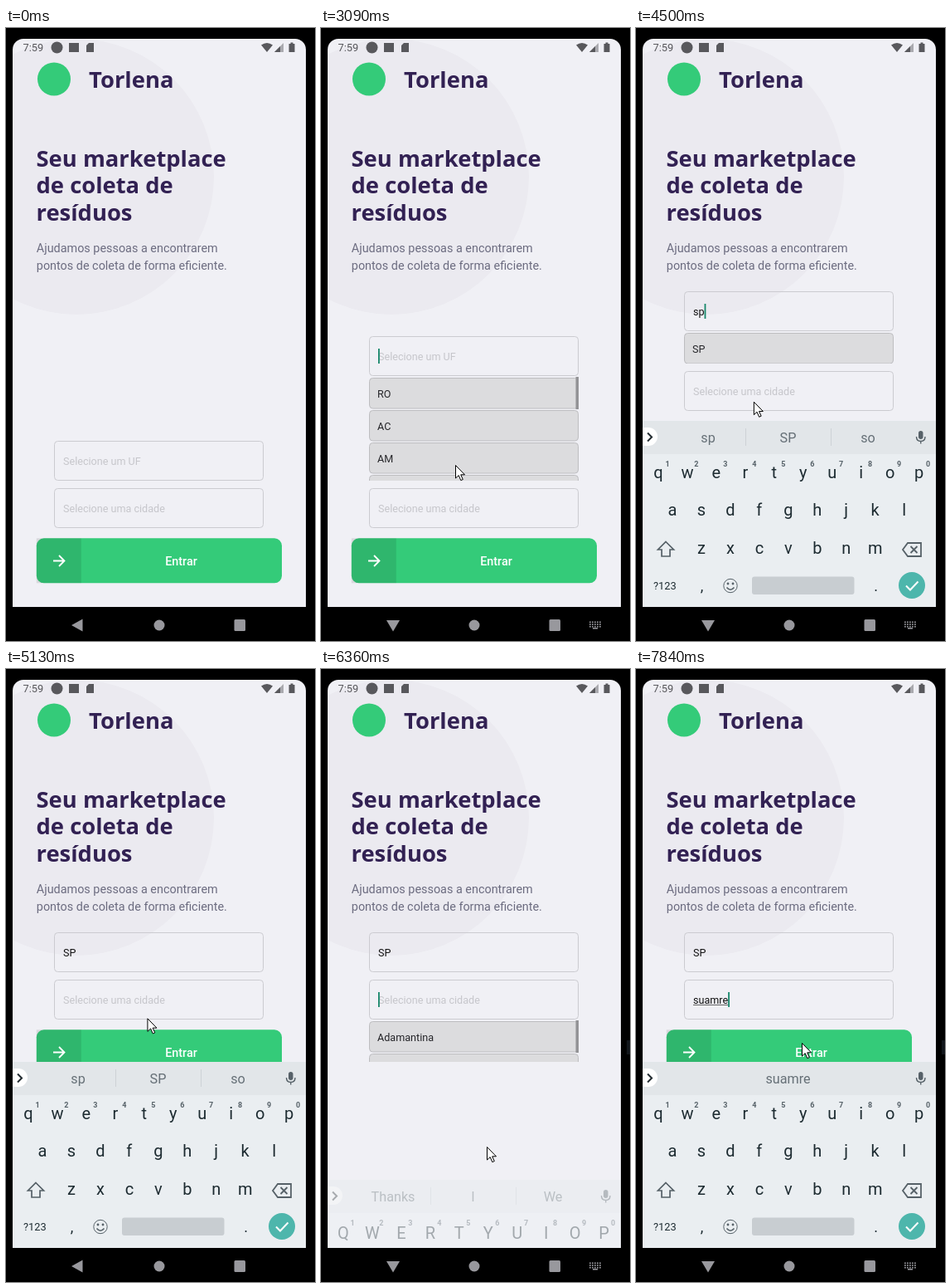
An HTML page with a canvas for the animation above (8 s loop, 373x738 px).

```html
<!DOCTYPE html>
<html lang="pt-BR">
<head>
<meta charset="utf-8">
<title>Torlena</title>
<style>
html, body { margin: 0; width: 100%; height: 100%; overflow: hidden; background: #000; }
canvas { display: block; width: 373px; height: 738px; }
</style>
</head>
<body>
<canvas id="stage"></canvas>
<script>
const W = 373, H = 738, LOOP = 8000, FOLD = 473;
const canvas = document.getElementById('stage');
const c = canvas.getContext('2d');
const dpr = window.devicePixelRatio || 1;
canvas.width = W * dpr;
canvas.height = H * dpr;

// [time, value] lists: the last entry that has begun applies
const pick = (steps, t) => steps.reduce((v, s) => t >= s[0] ? s[1] : v, steps[0][1]);
const within = (t, a, b) => t >= a && t < b;
const ramp = (t, a, b) => Math.min(1, Math.max(0, (t - a) / (b - a)));
const easeOut = p => 1 - (1 - p) ** 2;

const states = ['RO', 'AC', 'AM', 'RR'];
const cities = ['Adamantina', 'Adolfo', 'Aguaí', 'Agudos'];
const stateText = [[0, ''], [3800, 's'], [4345, 'sp'], [4965, 'SP']];
const stateList = [[0, []], [3005, states], [4105, ['SE', 'SP', 'SC']], [4415, ['SP']], [4965, []]];
const cityText = [[0, ''], [7075, 's'], [7295, 'su'], [7420, 'sua'], [7540, 'suam'], [7690, 'suamr'], [7800, 'suamre']];
const cityList = [[0, []], [6125, cities], [7145, ['Sabino', 'Sales', 'Salto', 'Santos']],
  [7375, ['Sud Mennucci', 'Sumaré', 'Suzano']], [7500, []]];
const hints = [[0, ['Thanks', 'I', 'We']], [3800, ['s', 'so', 'she']], [4415, ['sp', 'SP', 'so']],
  [5500, ['Thanks', 'I', 'We']], [7295, ['su', 'Su', 'so']], [7500, null]];
const pointer = [[1225, 282, 731], [1390, 262, 660], [1540, 190, 560], [1690, 150, 514], [1770, 162, 526],
  [4340, 162, 526], [4500, 142, 450], [4700, 112, 385], [4960, 112, 385], [5130, 170, 420],
  [5350, 263, 494], [5600, 215, 568], [5750, 200, 575], [6440, 200, 575], [6670, 200, 450]];

function text(s, x, y, size, color, { align = 'left', weight = 400, family = 'Roboto' } = {}) {
  c.font = `${weight} ${size}px ${family}, sans-serif`;
  c.textAlign = align;
  c.fillStyle = color;
  c.fillText(s, x, y);
}
function rect(x, y, w, h, color) {
  c.fillStyle = color;
  c.fillRect(x, y, w, h);
}
function round(x, y, w, h, r, fill, stroke) {
  c.beginPath();
  c.roundRect(x, y, w, h, r);
  paint(fill, stroke);
}
function circle(x, y, r, fill, stroke) {
  c.beginPath();
  c.arc(x, y, r, 0, 7);
  paint(fill, stroke);
}
function path(d, fill, stroke, width = 1, x = 0, y = 0) {
  c.save();
  c.translate(x, y);
  c.lineWidth = width;
  const p = new Path2D(d);
  if (fill) { c.fillStyle = fill; c.fill(p); }
  if (stroke) { c.strokeStyle = stroke; c.stroke(p); }
  c.restore();
}
function paint(fill, stroke) {
  if (fill) { c.fillStyle = fill; c.fill(); }
  if (stroke) { c.lineWidth = 1; c.strokeStyle = stroke; c.stroke(); }
}

function statusBar() {
  const ink = '#58585c';
  text('7:59', 20.5, 28, 12.8, ink);
  circle(61.5, 23.5, 7, ink);
  rect(76, 18, 12, 11, ink);
  path('M100 18h6v11h-9v-8z', ink);
  path('M308 20.5q7-5 14 0l-7 8.5z', ink);
  path('M335 18v11h-11z', '#a9a9ae');
  path('M331 22v7h-7z', ink);
  path('M341.5 19h2v-1.5h3v1.5h2v10h-7z', ink);
}

function header() {
  const title = { weight: 700, family: '"Open Sans"' };
  circle(85, 179, 166, '#ebeaf0');
  statusBar();
  circle(58, 61.5, 20, '#34cb79');
  text('Torlena', 100, 72, 27.4, '#322153', title);
  ['Seu marketplace', 'de coleta de', 'resíduos'].forEach((s, i) =>
    text(s, 36.5, 167 + 32.3 * i, 27.4, '#322153', title));
  text('Ajudamos pessoas a encontrarem', 36.8, 269.5, 14.4, '#6c6c80');
  text('pontos de coleta de forma eficiente.', 36.8, 291, 14.4, '#6c6c80');
}

function field(y, value, placeholder, focused, underlined) {
  round(58.5, y + .5, 252, 47, 4, null, '#cbcbd0');
  text(value || placeholder, 69, y + 28.5, 12.6, value ? '#111' : '#c6c6cb');
  const w = value ? c.measureText(value).width : 0;
  if (underlined) rect(69, y + 30, w, 1, '#666');
  if (focused) rect(69 + w, y + 15, 1.8, 18, '#16876a');
}

const listHeight = items => Math.min(126, items.length * 39);

function list(y, items) {
  if (!items.length) return;
  c.save();
  c.beginPath();
  c.rect(57, y + 49, 256, listHeight(items) - 1);
  c.clip();
  items.forEach((s, i) => {
    const top = y + 50 + 39 * i;
    round(58.5, top + .5, 252, 36.5, 4, '#dcdcde', '#bdbdc0');
    text(s, 68, top + 23.5, 12.6, '#26262a');
  });
  if (items.length > 3) rect(307.5, y + 49, 3.5, 39, '#939396');
  c.restore();
}

function button(y) {
  round(36.8, y, 296.2, 54, 9, '#34cb79');
  rect(36.8, y, 54, 54, 'rgba(0,0,0,.1)');
  path('M57 0H70M64-6.5 70.5 0 64 6.5', null, '#fff', 1.8, 0, y + 27.2);
  text('Entrar', 211.5, y + 32.5, 14.4, '#fff', { align: 'center', weight: 500 });
}

function form(t) {
  const ufs = pick(stateList, t), towns = pick(cityList, t);
  const ufH = listHeight(ufs), townH = listHeight(towns);
  const raised = within(t, 3325, 5275) || t >= 6285;
  const ufY = raised ? 317 : 497 - ufH - townH;
  const cityY = ufY + 57 + ufH;
  c.save();
  if (within(t, 3175, 5275) || t >= 6205) {
    c.beginPath();
    c.rect(0, 0, W, FOLD);
    c.clip();
  }
  field(ufY, pick(stateText, t), 'Selecione um UF', within(t, 1935, 4965));
  list(ufY, ufs);
  field(cityY, pick(cityText, t), 'Selecione uma cidade', t >= 5965, t >= 7075);
  list(cityY, towns);
  button(cityY + 60.3 + townH);
  c.restore();
}

function suggestions(words) {
  const word = (s, x) => text(s, x, 499, 16.2, '#667077', { align: 'center' });
  rect(8, FOLD, 354, 40, '#e2e6e9');
  round(-4, 481, 30, 22, 11, '#fff');
  path('M14 487.5l5 5-5 5', null, '#222b30', 2);
  if (words.length > 1) {
    [132, 235].forEach(x => rect(x, 482, 1, 21, '#cdd2d6'));
    words.forEach((s, i) => word(s, 87 + 96.5 * i));
  } else word(words[0], 183.5);
  round(341, 485, 5.5, 10, 2.75, '#566168');
  path('M338.5 492q0 5.5 5.25 5.5t5.25-5.5M343.75 497.5v3', null, '#566168', 1.4);
}

function keyboard(t) {
  const shown = t < 5500 ? ramp(t, 3500, 3720) * (1 - ramp(t, 5180, 5345)) : ramp(t, 6310, 6560);
  if (!shown) return;
  const upper = t < 3800 || within(t, 5500, 7295);
  const ink = '#1d2b31', soft = '#566168';
  c.save();
  c.beginPath();
  c.rect(8, FOLD, 354, 224);
  c.clip();
  c.globalAlpha = easeOut(shown);
  c.translate(0, (1 - easeOut(shown)) * 224);
  rect(8, 513, 354, 184, '#eaeef1');
  suggestions(pick(hints, t) || [pick(cityText, t)]);
  ['qwertyuiop', 'asdfghjkl', 'zxcvbnm'].forEach((row, r) => [...row].forEach((k, i) => {
    const x = [27, 44, 79][r] + 34.95 * i, y = 542 + 45.3 * r;
    text(upper ? k.toUpperCase() : k, x, y + (upper ? 2 : 0), 20, ink, { align: 'center' });
    if (!r) text((i + 1) % 10, x + 11, 528, 9, soft, { align: 'center', weight: 700 });
  }));
  path('M36 618.5l9.5 9.5h-4.5v8h-10v-8h-4.5z', upper ? soft : null, soft, 1.7);
  path('M322 628l6-8h16v16h-16zM331.5 624l8 8m0-8l-8 8', null, soft, 1.8);
  text('?123', 21, 676, 12.8, ink);
  text(',', 79.5, 678, 18, ink, { align: 'center' });
  circle(114, 671.5, 8.2, null, soft);
  circle(111, 669, 1.4, soft);
  circle(117, 669, 1.4, soft);
  path('M109.5 673.5q4.5 5.5 9 0', null, soft, 1.5);
  round(140, 660.5, 123.5, 21.5, 3, '#c8cdd1');
  text('.', 289.5, 678, 18, ink, { align: 'center' });
  circle(333, 671, 16, '#4db6ac');
  path('M326 671.5l5 5 9.5-10', null, '#fff', 2);
  c.restore();
}

function navBar(t) {
  const ink = '#98989d';
  const typing = within(t, 2545, 5125) || t >= 6045;
  rect(0, 697, W, 41, '#000');
  path(typing ? 'M79 713h16l-8 13.5z' : 'M79 719l13.5-7.5v15z', ink);
  circle(185, 719, 6.5, ink);
  round(275.5, 712, 13.5, 14, 1.5, ink);
  if (!typing) return;
  for (let y = 0; y < 3; y++)
    for (let x = 0; x < 5; x++) rect(324 + 3 * x, 714.5 + 2.7 * y, 1.8, 1.6, ink);
  rect(328, 722, 6, 1.5, ink);
}

function arrow(t) {
  if (t < pointer[0][0]) return;
  const i = pointer.findIndex(p => p[0] > t);
  const b = pointer.at(i), a = i < 0 ? b : pointer[i - 1];
  const k = ramp(t, a[0], b[0] + .001);
  path('M.5.5V16l3.7-3.4 2.6 6 2.5-1.1-2.6-5.7h4.8z', '#fff', '#000', 1,
    a[1] + (b[1] - a[1]) * k, a[2] + (b[2] - a[2]) * k);
}

function draw(t) {
  c.setTransform(dpr, 0, 0, dpr, 0, 0);
  rect(0, 0, W, H, '#000');
  c.save();
  c.beginPath();
  c.roundRect(8, 13, 354, 684, [13, 13, 0, 0]);
  c.clip();
  rect(8, 13, 354, 684, '#f0f0f5');
  header();
  form(t);
  keyboard(t);
  c.restore();
  navBar(t);
  if (t >= 5195) rect(369, 447, 4, 17, '#11161b');
  arrow(t);
}

const start = performance.now();
function tick() {
  draw((performance.now() - start) % LOOP);
  requestAnimationFrame(tick);
}
tick();
</script>
</body>
</html>
```
